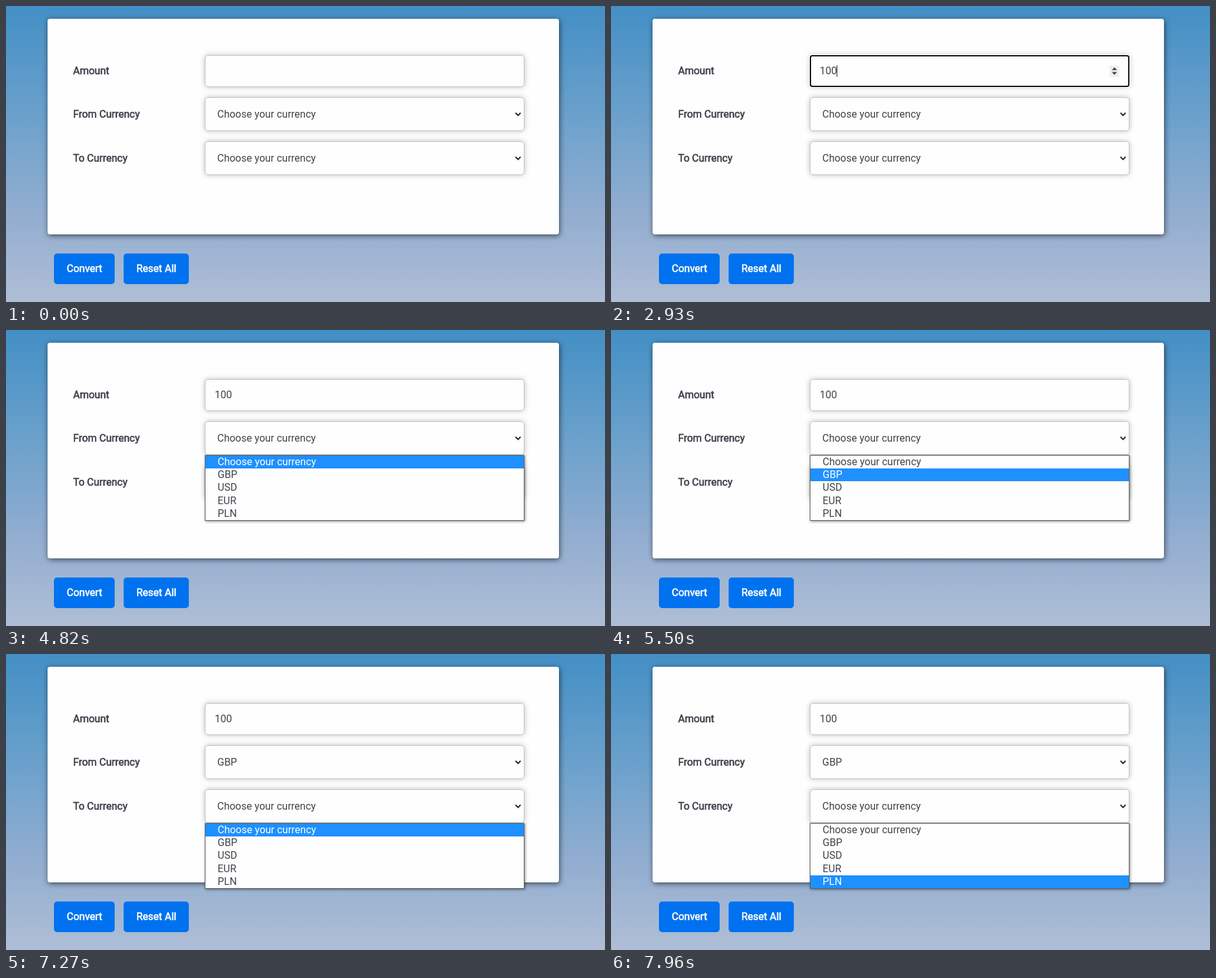
These frames come from a looping animation (937 px wide and 464 px high, 8000 ms). An HTML page:

```html
<!DOCTYPE html>
<html lang="en">
<head>
<meta charset="utf-8">
<title>Currency converter</title>
<style>
html, body { margin: 0; width: 100%; height: 100%; overflow: hidden; }
body {
  position: relative;
  font: 16px/19px Roboto, sans-serif;
  color: #40434b;
  background: linear-gradient(#438fc5, #6ea2cc 40%, #92add0 70%, #afbed6);
}
div, svg { position: absolute; box-sizing: border-box; white-space: pre; }
.card { background: #fefefe; border-radius: 4px; box-shadow: 1px 2px 8px rgba(0, 0, 0, .6); }
.field { background: #fefefe; border: 1px solid #c2c2c2; border-radius: 5px; box-shadow: 0 0 8px rgba(0, 0, 0, .25); }
.focus { border: 2px solid #101010; border-radius: 4px; box-shadow: 0 0 0 1px #fff, 0 0 8px rgba(0, 0, 0, .25); }
.button { background: #0072ef; border-radius: 5px; }
.bold { color: #3c404a; -webkit-text-stroke: .6px; }
.light { color: #fff; }
.popup { background: #fefefe; border: 1px solid #606060; box-shadow: 1px 1px 4px rgba(0, 0, 0, .5); }
.mark { background: #1e90ff; }
.caret { background: #222; }
svg { left: 0; top: 0; width: 937px; height: 464px; }
</style>
</head>
<body>
<script>
const LOOP = 8000;
const PROMPT = 'Choose your currency';
const OPTIONS = [PROMPT, 'GBP', 'USD', 'EUR', 'PLN'];
const rowY = i => Math.round(i * 20.2);

function box(cls, x, y, w, h, parent = document.body) {
  const el = document.createElement('div');
  el.className = cls;
  el.style.cssText = `left:${x}px;top:${y}px;width:${w}px;height:${h}px`;
  return parent.appendChild(el);
}

// y is the baseline
function label(str, x, y, cls = '', parent = document.body) {
  const el = box(cls, x, y - 15, 400, 19, parent);
  el.textContent = str;
  return el;
}

function drawing(content) {
  document.body.insertAdjacentHTML('beforeend', `<svg>${content}</svg>`);
  return document.body.lastChild;
}

function makePopup(y) {
  const el = box('popup', 311, y, 500, 103);
  const mark = box('mark', 0, 0, 498, 20, el);
  const rows = OPTIONS.map((name, i) => label(name, 19, 15 + rowY(i), '', el));
  return active => {
    el.hidden = active < 0;
    if (active < 0) return;
    mark.style.top = rowY(active) + 'px';
    mark.style.height = rowY(active + 1) - rowY(active) + 'px';
    rows.forEach((row, i) => row.className = i === active ? 'light' : '');
  };
}

box('card', 65, 20, 800, 338);
label('Amount', 105, 107, 'bold');
label('From Currency', 105, 175, 'bold');
label('To Currency', 105, 244, 'bold');
const amountField = box('field', 311, 77, 500, 50);
const fromField = box('field', 311, 143, 500, 53);
box('field', 311, 212, 500, 53);
const amount = label('', 326.5, 107);
const from = label(PROMPT, 330.5, 175);
label(PROMPT, 330.5, 244);
const caret = box('caret', 327, 93, 1, 18);
const chevron = y => `<path d="M797 ${y}l4 4 4-4" fill="none" stroke="#24262c" stroke-width="2"/>`;
drawing(chevron(167.5) + chevron(236.5));
const spinner = drawing(
  '<path d="M780 93h15v18h-15z" fill="#efefef"/>' +
  '<path d="M783.5 100.5l4-4.5 4 4.5zM783.5 103.5l4 4.5 4-4.5z" fill="#444"/>');

for (const [name, x, w] of [['Convert', 75, 95], ['Reset All', 184, 102]]) {
  box('button', x, 388, w, 48);
  label(name, x + 20, 417, 'bold light');
}
const fromPopup = makePopup(196);
const toPopup = makePopup(265);

// Value of the last step reached at time t
const at = (t, steps) => steps.reduce((value, [start, next]) => t >= start ? next : value, steps[0][1]);

function render(t) {
  const typed = at(t, [[0, ''], [1470, '1'], [2800, '10'], [2930, '100']]);
  amount.textContent = typed;
  caret.style.left = 327 + Math.floor(8.9 * typed.length) + 'px';
  caret.hidden = !at(t, [[0, 0], [460, 1], [990, 0], [1470, 1], [3450, 0], [3980, 1], [4480, 0]]);
  spinner.style.opacity = at(t, [[0, 0], [20, .33], [100, .67], [170, 1], [4790, 0]]);
  amountField.classList.toggle('focus', t >= 460 && t < 4790);
  fromField.classList.toggle('focus', t >= 6040 && t < 7270);
  from.textContent = t < 6040 ? PROMPT : 'GBP';
  fromPopup(at(t, [[0, -1], [4820, 0], [5500, 1], [6040, -1]]));
  toPopup(at(t, [[0, -1], [7270, 0], [7600, 1], [7650, 2], [7810, 3], [7960, 4]]));
}

let begin;
function tick(now) {
  begin ??= now;
  render((now - begin) % LOOP);
  requestAnimationFrame(tick);
}
render(0);
requestAnimationFrame(tick);
</script>
</body>
</html>
```
